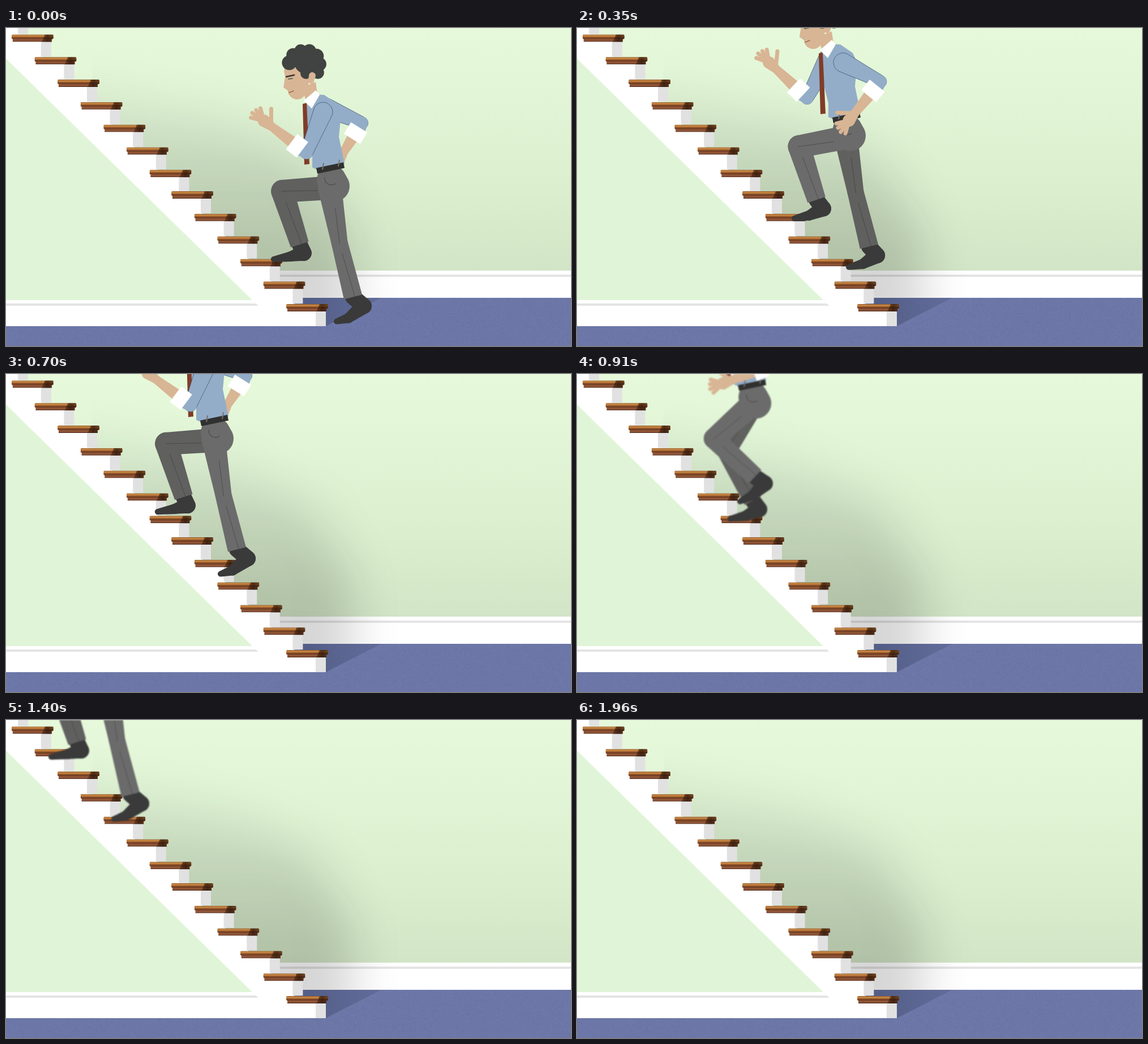
Animation of 998x561 px, one loop 2660 ms. Source, as an HTML page with a canvas:

```html
<!DOCTYPE html>
<html lang="en">
<head>
<meta charset="utf-8">
<title>Climbing the stairs</title>
<style>
html, body { margin: 0; width: 100%; height: 100%; overflow: hidden; background: #fff; }
canvas { display: block; width: 998px; height: 561px; }
</style>
</head>
<body>
<canvas id="stage" width="998" height="561"></canvas>
<script>
const W = 998, H = 561, LOOP = 2660, STEP = 70, LAST = 28, HALF = 5;
const SKIN = '#d8b594', SHIRT = '#93adc8', NEAR = '#6b6b6b', FAR = '#60605f';
const SHOE = '#3a3a3a', HAIR = '#404341', SEAM = 'rgba(58,82,112,.75)', CREASE = 'rgba(50,50,50,.5)';

const stage = document.getElementById('stage').getContext('2d');
const layer = () => {
  const c = document.createElement('canvas');
  c.width = W; c.height = H;
  return c.getContext('2d');
};
const back = layer(), man = layer();
let g = back;

const lerp = (a, b, k) => a + (b - a) * k;
const mix = (a, b, k) => a.map((v, i) => lerp(v, b[i], k));
const rad = d => d * Math.PI / 180;
const polar = (p, deg, len) => [p[0] + Math.cos(rad(deg)) * len, p[1] + Math.sin(rad(deg)) * len];

function paint(fill, stroke, width = 1) {
  if (fill) { g.fillStyle = fill; g.fill(); }
  if (stroke) { g.strokeStyle = stroke; g.lineWidth = width; g.stroke(); }
}
function rect(x, y, w, h, fill) { g.fillStyle = fill; g.fillRect(x, y, w, h); }
function poly(fill, ...p) {
  g.beginPath();
  for (let i = 0; i < p.length; i += 2) g.lineTo(p[i], p[i + 1]);
  g.closePath();
  paint(fill);
}
function disc(x, y, r, fill) {
  g.beginPath();
  g.arc(x, y, r, 0, 7);
  paint(fill);
}
function line(a, b, color, width = 1) {
  g.beginPath();
  g.moveTo(...a);
  g.lineTo(...b);
  paint(null, color, width);
}
// tapered limb from a to b, optionally with a straight far end
function limb(a, b, ra, rb, fill, stroke, flat) {
  const t = Math.atan2(b[1] - a[1], b[0] - a[0]), q = Math.PI / 2;
  g.beginPath();
  g.arc(...a, ra, t + q, t - q);
  if (flat) for (const s of [-q, q]) g.lineTo(b[0] + Math.cos(t + s) * rb, b[1] + Math.sin(t + s) * rb);
  else g.arc(...b, rb, t - q, t + q);
  g.closePath();
  paint(fill, stroke);
}
function fade(x1, y1, x2, y2, ...colors) {
  const l = g.createLinearGradient(x1, y1, x2, y2);
  colors.forEach((c, i) => l.addColorStop(i / (colors.length - 1), c));
  return l;
}

// ---- room ----
function carpet() {
  rect(0, 476, W, 85, '#6c77a7');
  const img = g.getImageData(0, 476, W, 85), d = img.data;
  let s = 7;
  for (let i = 0; i < d.length; i += 4) {
    s = (s * 16807) % 2147483647;
    for (let k = 0; k < 3; k++) d[i + k] += s % 9 - 4;
  }
  g.putImageData(img, 0, 476);
}
function wallShadow() {
  g.save();
  g.beginPath();
  g.rect(153, 0, W, 476);
  g.clip();
  g.filter = 'blur(40px)';
  poly(fade(0, 110, 0, 390, 'rgba(10,10,10,.05)', 'rgba(10,10,10,.115)', 'rgba(10,10,10,.165)'),
    60, 95, 400, 165, 540, 230, 612, 360, 612, 620, 60, 620);
  g.restore();
}
function tread(x, y) {
  g.save();
  g.beginPath();
  g.roundRect(x, y, 74, 8, 2);
  g.rect(x + 2, y + 7, 69, 6);
  g.clip();
  rect(x, y, 74, 13, fade(0, y, 0, y + 13, '#8a5024', '#cf914a', '#a9652f', '#6b3a20', '#8c5234', '#94593a', '#4a2517'));
  poly(fade(x + 53, 0, x + 74, 0, 'rgba(50,24,8,.45)', 'rgba(42,20,8,.75)', 'rgba(60,30,12,.6)'),
    x + 59, y, x + 75, y, x + 75, y + 14, x + 53, y + 14);
  g.restore();
}
function room() {
  g = back;
  rect(0, 0, W, 480, fade(0, 0, 0, 428, '#e6f9db', '#e1f5d6', '#dbefcf', '#d2e5c6'));
  carpet();
  rect(0, 428, W, 48, '#fff');
  rect(0, 435, W, 4, '#e4e4e5');
  wallShadow();
  poly(fade(540, 0, 655, 0, 'rgba(60,70,105,.5)', 'rgba(70,80,120,.3)'), 520, 476, 663, 476, 565, 526, 520, 526);

  const steps = [];
  for (let i = 0; i < 14; i++) {
    const late = i > 5 ? 2 : 0;
    steps.push([495 - 40.6 * i + late, 487 - 39.8 * i + late]);
  }
  for (const [x, y] of steps) rect(0, y + 8, x + 55, 518 - y, '#fff');
  for (const [x, y] of steps) rect(x + 52, y + 12, 18, 27, '#e1e1e2');
  poly('#e0f5d7', 0, 54, 435, 480, 0, 480);
  poly('#e4e4e5', 0, 486, 441, 486, 446, 490, 0, 490);
  for (const [x, y] of steps) tread(x, y);
}

// ---- figure ----
function shoe(ankle, turn, bend) {
  g.save();
  g.translate(...ankle);
  g.rotate(rad(turn));
  const heel = mix([7, 15], [19, 16], bend);
  const ball = mix([-16, 21], [-8, 37], bend);
  const toe = mix([-46, 26], [-29, 43], bend);
  limb([0, 0], heel, 14, 14, SHOE);
  limb(heel, ball, 14, 9, SHOE);
  limb(ball, toe, 9, 5, SHOE);
  g.restore();
}
// phase 0 is the trailing pose, 0.5 the raised one
function leg(phase, color, high, bend) {
  const p = phase % 1, swing = p < .5;
  const k = swing ? (1 - Math.cos(p * 2 * Math.PI)) / 2 : 2 - 2 * p;
  const dip = Math.sin((p % .5) * 2 * Math.PI);
  const thigh = lerp(80, high, k), shin = lerp(76, 72, k) - dip * (swing ? 32 : 13);
  const hip = [572, 282];
  const knee = polar(hip, thigh, lerp(98, 84, k));
  const ankle = polar(knee, shin, 99);
  const r = lerp(14.5, 20, k);

  shoe(ankle, swing ? -14 * dip : 0, bend + .6 * (1 - k));
  limb(knee, ankle, r, 16.5, color, null, true);
  limb(hip, knee, 21, r, color);
  line(polar(knee, shin, 20), polar(ankle, shin - 60, 4), CREASE);
  line(polar(knee, thigh, 2), polar(knee, thigh + 183, 62), CREASE);
}

function hand(wrist, dir) {
  g.lineCap = 'round';
  const palm = polar(wrist, dir, 16);
  limb(wrist, palm, 8, 11, SKIN);
  for (let i = 0; i < 4; i++) {
    const a = dir - 14 + i * 12;
    line(palm, polar(wrist, a, 41 - 2 * Math.abs(i - 1)), SKIN, 7);
  }
  line(wrist, polar(wrist, dir + 53, 31), SKIN, 7);
}
// pose: shoulder x, y, then angle and length of upper arm and forearm
function arm(aft, fore, k) {
  const [x, y, ua, ul, fa, fl] = mix(aft, fore, k);
  const s = [x, y], e = polar(s, ua, ul), w = polar(e, fa, fl);
  limb(polar(e, fa, 20), w, 11, 7.5, SKIN);
  hand(w, fa);
  limb(s, e, 17, 11, SHIRT, SEAM);
  limb(e, polar(e, fa, 12), 11, 13, SHIRT);
  g.lineCap = 'butt';
  line(polar(e, fa, 9), polar(e, fa, 33), '#fff', 34);
}

function torso() {
  poly(SHIRT, 545, 117, 562, 118, 584, 133, 592, 150, 588, 192, 598, 240, 550, 250, 541, 246, 541, 222, 527, 165, 527, 136);
  poly('#803c28', 524, 134, 531, 132, 536, 240, 527, 241);
  g.lineCap = 'butt';
  line([549, 252], [597, 242], '#30302f', 10);
  for (const x of [560, 588]) line([x - 1, 255 - x / 5 + 107], [x + 1, 243 - x / 5 + 107], '#77736c', 2);
  g.beginPath();
  g.arc(575, 265, 12, .9, 3.3);
  paint(null, CREASE, 1.3);
}
function head() {
  poly(SKIN, 522, 105, 547, 95, 550, 116, 533, 137);
  poly('#fff', 526, 128, 547, 110, 554, 118, 540, 142);
  limb([516, 78], [514, 110], 25, 16, SKIN);
  poly(SKIN, 493, 86, 490, 105, 500, 112);
  for (let a = 190; a <= 420; a += 33) disc(...polar([527, 66], a, 27), 12 + Math.sin(a), HAIR);
  disc(530, 60, 21, HAIR);
  disc(530, 80, 10, HAIR);
  limb([541, 84], [539, 93], 6, 5, SKIN);
  g.lineCap = 'round';
  line([495, 86], [509, 83], '#3a3430', 2.6);
  line([499, 90], [506, 89], '#66705f', 1.8);
  line([500, 114], [508, 111], '#8b4e3a', 1.3);
}

// body position at each half stride, carried on at the last pace
const PATH = [[0, 0], [-97, -89], [-205, -165], [-303, -269], [-393, -343]];
function bodyAt(n) {
  const i = Math.min(PATH.length - 2, Math.floor(n / HALF));
  return mix(PATH[i], PATH[i + 1], n / HALF - i);
}

function figure(n) {
  g = man;
  g.clearRect(0, 0, W, H);
  const phase = n / HALF / 2;
  const sway = (1 + Math.cos(phase * 2 * Math.PI)) / 2;
  g.save();
  g.translate(...bodyAt(n));
  arm([566, 141, 23, 68, 122, 62], [541, 142, 118, 80, 223, 76], 1 - sway);
  leg(phase + .5, FAR, 176, 0);
  limb([575, 268], [580, 279], 26, 27, NEAR);
  leg(phase, NEAR, 169, .4);
  torso();
  head();
  arm([567, 150, 27, 74, 129, 72], [560, 148, 112, 78, 217, 78], sway);
  g.restore();
}

let shown = -1;
function draw() {
  const n = Math.min(LAST, Math.floor(performance.now() % LOOP / STEP));
  if (n !== shown) {
    shown = n;
    stage.drawImage(back.canvas, 0, 0);
    if (n < LAST) {
      figure(n);
      const blur = n < 11 ? 0 : Math.max(1.3, Math.min(4, n - 20));
      stage.filter = blur ? `blur(${blur}px)` : 'none';
      stage.drawImage(man.canvas, 0, 0);
      stage.filter = 'none';
    }
  }
  requestAnimationFrame(draw);
}
room();
draw();
</script>
</body>
</html>
```
